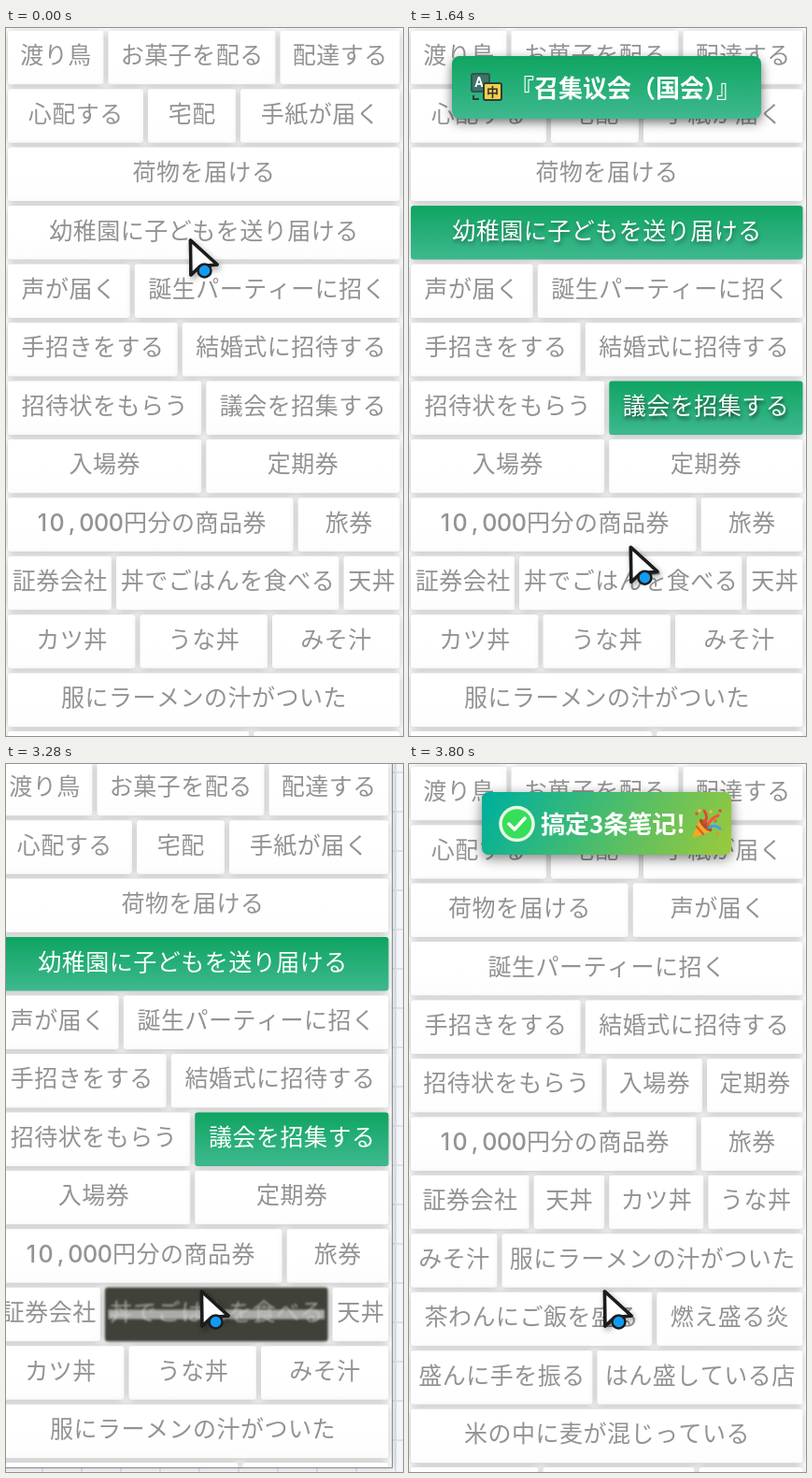
Animation of 425 by 757 pixels, one loop 4240 ms. Source, as an HTML page with a canvas:

```html
<!DOCTYPE html>
<html lang="ja">
<head>
<meta charset="utf-8">
<style>
  html, body { margin: 0; width: 100%; height: 100%; overflow: hidden; background: #fff; }
  canvas { display: block; width: 425px; height: 757px; }
</style>
</head>
<body>
<canvas id="stage" width="425" height="757"></canvas>
<script>
const ctx = document.getElementById('stage').getContext('2d');
const W = 425, H = 757, LOOP = 4240;
const KANJI = '"Noto Sans CJK JP", "Noto Sans CJK", sans-serif';
const HANZI = '"Noto Sans CJK SC", "Noto Sans CJK", sans-serif';
const REFLOW = 3360, STRIKE = 2600;

const clicks = {
  '幼稚園に子どもを送り届ける': 80,
  '議会を招集する': 1200,
  '丼でごはんを食べる': 2080
};
const struck = '丼でごはんを食べる';
const words = ('渡り鳥 お菓子を配る 配達する 心配する 宅配 手紙が届く 荷物を届ける ' +
  '幼稚園に子どもを送り届ける 声が届く 誕生パーティーに招く 手招きをする 結婚式に招待する ' +
  '招待状をもらう 議会を招集する 入場券 定期券 10,000円分の商品券 旅券 証券会社 ' +
  '丼でごはんを食べる 天丼 カツ丼 うな丼 みそ汁 服にラーメンの汁がついた ' +
  '茶わんにご飯を盛る 燃え盛る炎 盛んに手を振る はん盛している店 ' +
  '米の中に麦が混じっている 道が混む 麦茶を飲む 小麦粉').split(' ');

const toasts = [
  { text: '『送孩子去幼儿园』', start: 121, fade: 420, end: 600 },
  { text: '『召集议会（国会）』', start: 1201, fade: 1760, end: 1960 },
  { text: '『用丼（大碗）吃饭』', start: 2109, fade: 2400, end: 2700 }
];

// [time, x, y]
const cursorPath = [[0, 196, 225], [340, 196, 225], [600, 227, 302], [680, 240, 330], [920, 300, 417],
  [1040, 302, 394], [1400, 302, 394], [1720, 224, 582], [1960, 213, 601], [2440, 213, 601],
  [2600, 266, 593], [2760, 266, 593], [3080, 208, 562]];
const shakePath = [[3180, 0, 0], [3280, -12, -5], [3360, 9, 6], [3440, -8, -5], [3520, 4, 7],
  [3600, 0, -10], [3680, 0, 4], [3760, 0, 0]];

const clamp = v => Math.max(0, Math.min(1, v));
const ramp = (t, a, b) => clamp((t - a) / (b - a));
const mix = (a, b, p) => a + (b - a) * p;

function along(path, t) {
  const next = path.findIndex(k => k[0] > t);
  if (next < 1) return (next ? path[path.length - 1] : path[0]).slice(1);
  const a = path[next - 1], b = path[next];
  const u = ramp(t, a[0], b[0]), p = u * u * (3 - 2 * u);
  return [mix(a[1], b[1], p), mix(a[2], b[2], p)];
}

const isDigit = c => /[0-9,]/.test(c);
const charWidth = c => isDigit(c) ? 15.8 : 25.5;
const textWidth = s => [...s].reduce((sum, c) => sum + charWidth(c), 0);

// Greedy wrapping; spare width is shared equally within a row.
function layout(list) {
  const full = 419.5, gap = 5, minPad = 8, rows = [];
  let used = Infinity;
  for (const word of list) {
    const need = textWidth(word) + minPad;
    if (used + gap + need > full) { rows.push([]); used = -gap; }
    rows[rows.length - 1].push(word);
    used += gap + need;
  }
  return rows.flatMap((row, i) => {
    const text = row.reduce((sum, w) => sum + textWidth(w), 0);
    const pad = (full - text - gap * (row.length - 1)) / row.length;
    let x = 2;
    return row.map(word => {
      const card = { word, x, y: 2.7 + 62.45 * i, w: textWidth(word) + pad, h: 57.5 };
      x += card.w + gap;
      return card;
    });
  });
}
const before = layout(words);
const after = layout(words.filter(w => !(w in clicks)));

function shadow(color, blur = 0, x = 0, y = 0) {
  ctx.shadowColor = color;
  ctx.shadowBlur = blur;
  ctx.shadowOffsetX = x;
  ctx.shadowOffsetY = y;
}
const noShadow = () => shadow('transparent');

function gradient(x0, y0, x1, y1, ...colors) {
  const g = ctx.createLinearGradient(x0, y0, x1, y1);
  colors.forEach((c, i) => g.addColorStop(i / (colors.length - 1), c));
  return g;
}

function box(x, y, w, h, r, fill) {
  ctx.fillStyle = fill;
  ctx.beginPath();
  ctx.roundRect(x, y, w, h, r);
  ctx.fill();
}

function dot(x, y, r, fill, stroke, width) {
  ctx.beginPath();
  ctx.arc(x, y, r, 0, 7);
  ctx.fillStyle = fill;
  ctx.fill();
  if (stroke) {
    ctx.strokeStyle = stroke;
    ctx.lineWidth = width;
    ctx.stroke();
  }
}

function shape(points, closed) {
  ctx.beginPath();
  points.forEach(p => ctx.lineTo(...p));
  if (closed) ctx.closePath();
}

function cardText(word, cx, baseline) {
  ctx.textAlign = 'center';
  let x = cx - textWidth(word) / 2;
  for (const c of word) {
    const w = charWidth(c);
    ctx.font = isDigit(c) ? '500 25px Inter, sans-serif' : `25px ${KANJI}`;
    ctx.fillText(c, x + w / 2, baseline);
    x += w;
  }
}

function drawCard({ word, x, y, w, h }, t) {
  const age = t - (clicks[word] ?? Infinity);
  const done = word === struck && t >= STRIKE;
  const vanish = done ? ramp(t, 3180, 3360) : 0;
  const cx = x + w / 2;
  let fill = gradient(0, y, 0, y + h, '#fff', '#fff', '#fdfdfd');
  let ink = '#939393';
  if (done) {
    fill = '#404138';
    ink = '#c4c4bf';
  } else if (age >= 0) {
    fill = gradient(0, y, 0, y + h, '#0fa461', '#3eb98f');
    const v = Math.round(mix(150, 255, ramp(age, 60, 360)));
    ink = `rgb(${v},${v},${v})`;
  }
  ctx.save();
  if (vanish) ctx.filter = `blur(${vanish * 2.2}px)`;
  shadow('rgba(0,0,0,.27)', 8, 0, 1);
  box(x, y, w, h, 3, fill);
  noShadow();
  if (age >= 60 && !done) {
    const depth = ramp(age, 60, 360) * (1 - ramp(age, 1200, 2000));
    shadow(`rgba(0,0,0,${0.6 * depth})`, 4, 1, 3);
  }
  ctx.globalAlpha = 1 - vanish * 0.5;
  ctx.fillStyle = ink;
  cardText(word, cx, y + 35.5);
  if (done) {
    const half = textWidth(word) / 2 + 1;
    box(cx - half, y + h / 2 - 5, half * 2, 10, 0, '#d6d6d6');
  }
  ctx.restore();
}

function translateIcon(x, y) {
  ctx.textAlign = 'center';
  box(x, y, 21, 21, 3, '#2d5652');
  box(x + 2, y + 2, 17, 17, 1, '#3d7368');
  ctx.fillStyle = '#fff';
  ctx.font = 'bold 14px Roboto, sans-serif';
  ctx.fillText('A', x + 9, y + 15);
  box(x + 13, y + 10, 21, 20, 3, '#2d3e35');
  box(x + 15, y + 12, 17, 16, 1, '#f3cf4a');
  ctx.fillStyle = '#333';
  ctx.font = `bold 13px ${HANZI}`;
  ctx.fillText('中', x + 23.5, y + 25);
  ctx.strokeStyle = '#2d3e35';
  ctx.lineWidth = 2;
  shape([[x + 3, y + 24], [x + 3, y + 28], [x + 9, y + 28]]);
  ctx.stroke();
}

function toastText(text, x, baseline) {
  ctx.textAlign = 'left';
  ctx.fillStyle = '#fff';
  ctx.font = `bold 26px ${HANZI}`;
  ctx.fillText(text, x, baseline);
}

const slideIn = (t, start, length) => 30 - 67 * (1 - ramp(t, start, start + length));

function drawToast({ text, start, fade, end }, t) {
  if (t < start || t >= end) return;
  const w = 71 + 26 * text.length, x = 211.5 - w / 2, y = slideIn(t, start, 60);
  ctx.save();
  ctx.globalAlpha = 1 - ramp(t, fade, end);
  shadow('rgba(0,0,0,.55)', 12, 0, 4);
  box(x, y, w, 67, 8, gradient(0, y, 0, y + 67, '#0fa461', '#3eb98f'));
  noShadow();
  translateIcon(x + 20, y + 18);
  toastText(text, x + 62, y + 44);
  ctx.restore();
}

function partyPopper(x, y) {
  ctx.fillStyle = '#f9a825';
  shape([[x, y + 31], [x + 8, y + 11], [x + 21, y + 24]], true);
  ctx.fill();
  ctx.strokeStyle = '#d9632b';
  ctx.lineWidth = 2.5;
  shape([[x + 5, y + 19], [x + 12, y + 27]]);
  ctx.stroke();
  ctx.save();
  ctx.translate(x + 14.5, y + 17.5);
  ctx.rotate(Math.PI / 4);
  ctx.scale(1, 0.35);
  dot(0, 0, 9, '#a9502c');
  ctx.restore();
  ctx.lineWidth = 3;
  const streamer = (color, a, b, c) => {
    ctx.strokeStyle = color;
    ctx.beginPath();
    ctx.moveTo(x + a[0], y + a[1]);
    ctx.quadraticCurveTo(x + b[0], y + b[1], x + c[0], y + c[1]);
    ctx.stroke();
  };
  streamer('#e5453b', [13, 15], [18, 9], [13, 2]);
  streamer('#f0592f', [17, 17], [20, 10], [28, 7]);
  streamer('#4a9be8', [18, 20], [24, 16], [30, 21]);
  [[5, 5, '#ee4b3c'], [20, 3, '#f6c431'], [25, 13, '#e94e7c'], [27, 27, '#f28b30'],
    [8, 2, '#f6c431'], [30, 2, '#e5453b']].forEach(([dx, dy, c]) => dot(x + dx, y + dy, 1.7, c));
}

function drawDoneToast(t) {
  if (t < REFLOW + 20) return;
  const x = 78, y = slideIn(t, REFLOW + 20, 120);
  ctx.save();
  shadow('rgba(0,0,0,.5)', 14, 0, 4);
  box(x, y, 267, 67, 7, gradient(x + 30, y - 30, x + 237, y + 97, '#00b09b', '#96c93d'));
  noShadow();
  dot(x + 37.5, y + 34, 17.5, '#36df59', '#e9f7e4', 3.5);
  ctx.strokeStyle = '#fff';
  ctx.lineWidth = 3.5;
  ctx.lineCap = ctx.lineJoin = 'round';
  shape([[x + 29, y + 34], [x + 35, y + 40], [x + 46, y + 28]]);
  ctx.stroke();
  toastText('搞定3条笔记!', x + 63, y + 43.5);
  partyPopper(x + 225, y + 18);
  ctx.restore();
}

function drawBackdrop() {
  ctx.fillStyle = '#f3f5f9';
  ctx.fillRect(0, 0, W, H);
  ctx.fillStyle = '#dce1ea';
  for (let p = 8; p < H; p += 42) {
    ctx.fillRect(0, p, W, 2);
    ctx.fillRect(p + 30, 0, 2, H);
  }
}

function drawPage(t) {
  const [dx, dy] = along(shakePath, t);
  ctx.save();
  ctx.translate(dx, dy);
  shadow('rgba(0,0,0,.3)', 6);
  ctx.fillStyle = '#fff';
  ctx.fillRect(0, 0, W, H);
  noShadow();
  ctx.strokeStyle = '#8b8b8b';
  ctx.lineWidth = 1;
  ctx.strokeRect(-0.5, -0.5, W + 1, H + 1);
  ctx.beginPath();
  ctx.rect(0, 0, W, H);
  ctx.clip();
  (t < REFLOW ? before : after).forEach(card => drawCard(card, t));
  toasts.forEach(toast => drawToast(toast, t));
  drawDoneToast(t);
  ctx.restore();
}

function drawCursor(t) {
  const [x, y] = along(cursorPath, t);
  ctx.save();
  ctx.translate(x, y);
  ctx.lineJoin = 'round';
  ctx.lineWidth = 3.5;
  ctx.strokeStyle = '#1c1c1c';
  ctx.fillStyle = '#fff';
  shape([[1.5, 2], [2, 39], [12, 29.5], [30, 28]], true);
  shadow('rgba(0,0,0,.45)', 6, 2, 3);
  ctx.stroke();
  noShadow();
  ctx.fill();
  ctx.stroke();
  dot(16.5, 34.5, 7, '#119bf3', '#1c1c1c', 2.5);
  ctx.restore();
}

function frame(now) {
  const t = now % LOOP;
  drawBackdrop();
  drawPage(t);
  drawCursor(t);
  requestAnimationFrame(frame);
}
requestAnimationFrame(frame);
</script>
</body>
</html>
```
